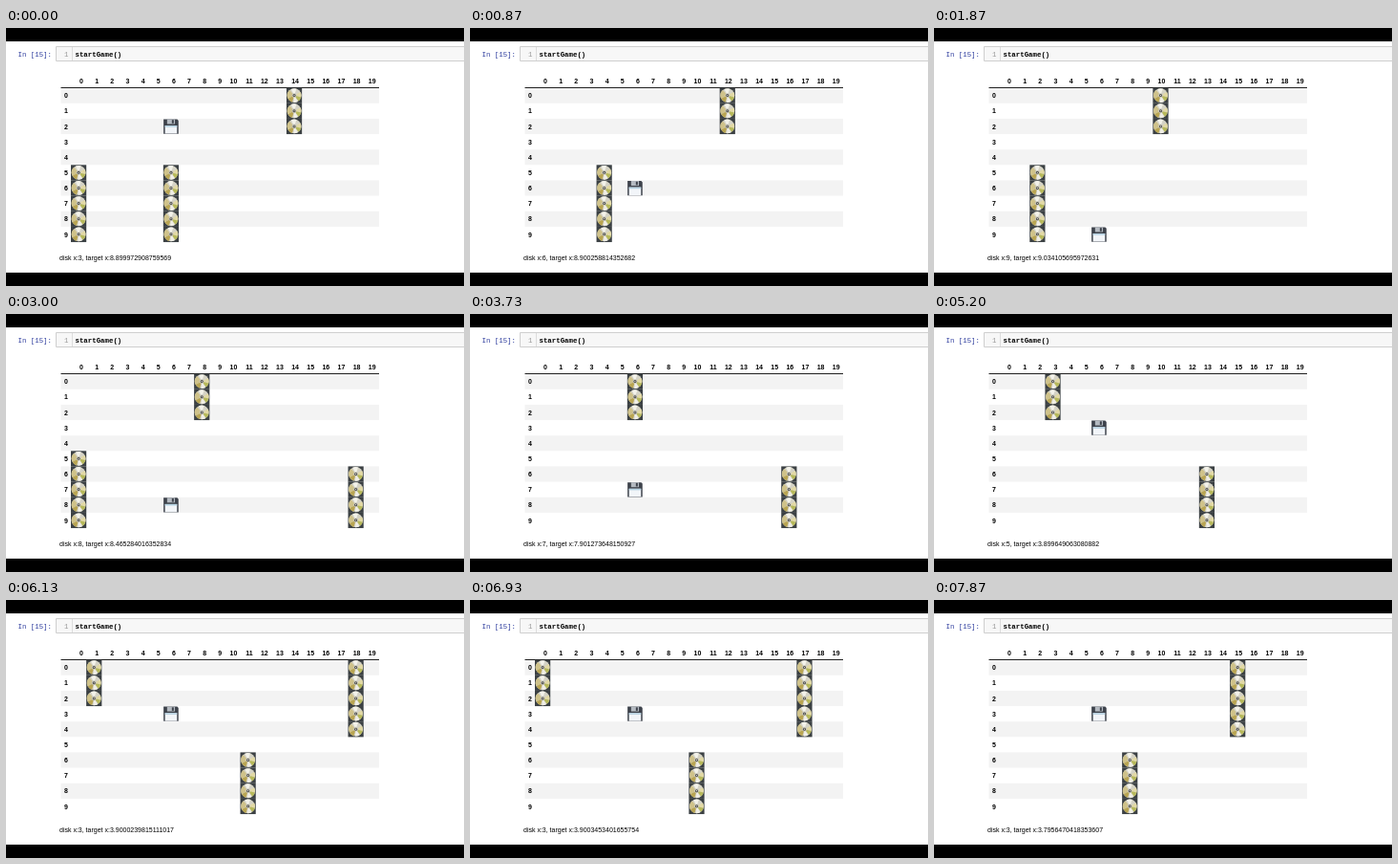
Write an HTML page that moves like this. It is 480 by 270 pixels and loops after 8000 ms.

```html
<!DOCTYPE html>
<html lang="en">
<head>
<meta charset="utf-8">
<title>startGame()</title>
<style>
  html, body { margin: 0; width: 100%; height: 100%; overflow: hidden; background: #000; }
  svg { display: block; width: 480px; height: 270px; }
  text { font: 7px "Liberation Sans", Arial, sans-serif; white-space: pre; }
  .label { font-weight: bold; }
  .code { font: 7.4px "Liberation Mono", monospace; }
</style>
</head>
<body>
<svg viewBox="0 0 480 270">
  <defs>
    <g id="disc">
      <rect width="16.2" height="16.2" fill="#3b4043"/>
      <circle cx="8.1" cy="8" r="7.4" fill="#d5d3c6"/>
      <path d="M8.1 8L3.2 2.5A7.4 7.4 0 0 0 1.6 11.5Z" fill="#cfc28a"/>
      <path d="M8.1 8L1.6 11.5A7.4 7.4 0 0 0 6 15.1Z" fill="#b9a552"/>
      <path d="M8.1 8L5 1.3A7.4 7.4 0 0 1 10.5 1Z" fill="#f3f2ea"/>
      <path d="M8.1 8L14.6 4.5A7.4 7.4 0 0 1 15.3 9.8Z" fill="#e2d9a6"/>
      <path d="M8.1 8L15.3 9.8A7.4 7.4 0 0 1 12.6 13.9Z" fill="#b7b95a"/>
      <path d="M8.1 8L12 14.3A7.4 7.4 0 0 1 7.5 15.4Z" fill="#f1efe6"/>
      <circle cx="8.1" cy="8" r="2.4" fill="#c9c8c0"/>
      <circle cx="8.1" cy="8" r="1.5" fill="#4b4a45"/>
      <circle cx="8.1" cy="8" r=".6" fill="#e8e8e4"/>
    </g>
    <g id="floppy">
      <path d="M.3 .6H14.6L15.9 2V15.8H.3Z" fill="#3d424b"/>
      <rect x="4" y=".6" width="8.2" height="5" fill="#b4bac1"/>
      <rect x="9" y="1.3" width="2" height="3.6" fill="#3d424b"/>
      <rect x="1.8" y="7.2" width="12.6" height="8.4" fill="#f2f5f9"/>
      <rect x="1.8" y="7.2" width="12.6" height="1.6" fill="#b5d2e2"/>
    </g>
  </defs>
  <rect y="14" width="480" height="242" fill="#fff"/>
  <path d="M490 19.5H52.5V34.5H490" fill="#f7f7f7" stroke="#cfcfcf"/>
  <path d="M69.5 20V34" stroke="#dcdcdc"/>
  <text class="code" x="12.5" y="29.8" fill="#303f9f">In [15]:</text>
  <text class="code" x="61" y="29.8" fill="#999">1</text>
  <text class="code" x="72.5" y="29.8" font-weight="bold" style="font-weight:bold">startGame()</text>
  <g id="table"></g>
  <path d="M57.5 62.5H391" stroke="#222"/>
  <g id="sprites"></g>
  <text id="status" x="56" y="243.4"></text>
</svg>
<script>
const FPS = 15, FRAMES = 120, CELL = 16.14, LEFT = 68, TOP = 62.6;
const $ = id => document.getElementById(id);

// Obstacles: starting column, first row, last row
const walls = [[0, 5, 9], [6, 5, 9], [14, 0, 2], [24, 6, 9], [31, 0, 4]];

// Keys are [frame, value]
const climb = [[6, 4], [10, 5], [13, 6], [17, 7], [21, 8], [28, 9], [37, 8], [54, 7]];
const diskRow = [[0, 2], [2, 3], ...climb, [71, 6], [73, 5], [75, 4], [77, 3]];
const printedRow = [[0, 3], ...climb, [73, 6], [77, 5], [80, 4], [83, 3]];
const target = [
  [0, 8.899972908759569], [20, 8.900412763518204], [28, 9.034105695972631],
  [32, 9.034105695972631], [45, 8.465284016352834], [46, 8.465284016352834],
  [56, 7.901273648150927], [67, 7.899852518015058], [70, 7.899852518015058],
  [73, 3.902718453629175], [78, 3.899649063080882], [104, 3.9003453401655754],
  [118, 3.7956470418353607], [120, 3.7956470418353607]
];

const held = (keys, f) => keys.filter(k => k[0] <= f).pop()[1];

function between(keys, f) {
  const i = keys.findIndex(k => k[0] > f);
  const [f0, a] = keys[i - 1], [f1, b] = keys[i];
  return a + (b - a) * (f - f0) / (f1 - f0);
}

const sprite = (id, col, row) =>
  `<use href="#${id}" x="${LEFT + col * CELL}" y="${TOP + row * CELL}"/>`;

function buildTable() {
  let out = "";
  for (let row = 0; row < 10; row++) {
    const y = TOP + row * CELL;
    if (row % 2 === 0) out += `<rect x="57.5" y="${y}" width="333.5" height="${CELL}" fill="#f3f3f3"/>`;
    out += `<text class="label" x="63" y="${y + 10.7}" text-anchor="middle">${row}</text>`;
  }
  for (let col = 0; col < 20; col++)
    out += `<text class="label" x="${LEFT + 13 + col * CELL}" y="57.8" text-anchor="end">${col}</text>`;
  $("table").innerHTML = out;
}

function draw(f) {
  const steps = Math.floor((f + 5.5) / 7.5);
  let out = "";
  for (const [start, first, last] of walls) {
    const col = start - steps;
    if (col < 0 || col > 19) continue;
    for (let row = first; row <= last; row++) out += sprite("disc", col, row);
  }
  $("sprites").innerHTML = out + sprite("floppy", 6, held(diskRow, f));
  $("status").textContent = `disk x:${held(printedRow, f)}, target x:${between(target, f)}`;
}

let shown = -1;
const begin = performance.now();
function tick() {
  const f = Math.floor((performance.now() - begin + 4) * FPS / 1000) % FRAMES;
  if (f !== shown) draw(shown = f);
  requestAnimationFrame(tick);
}

buildTable();
draw(0);
tick();
</script>
</body>
</html>
```
